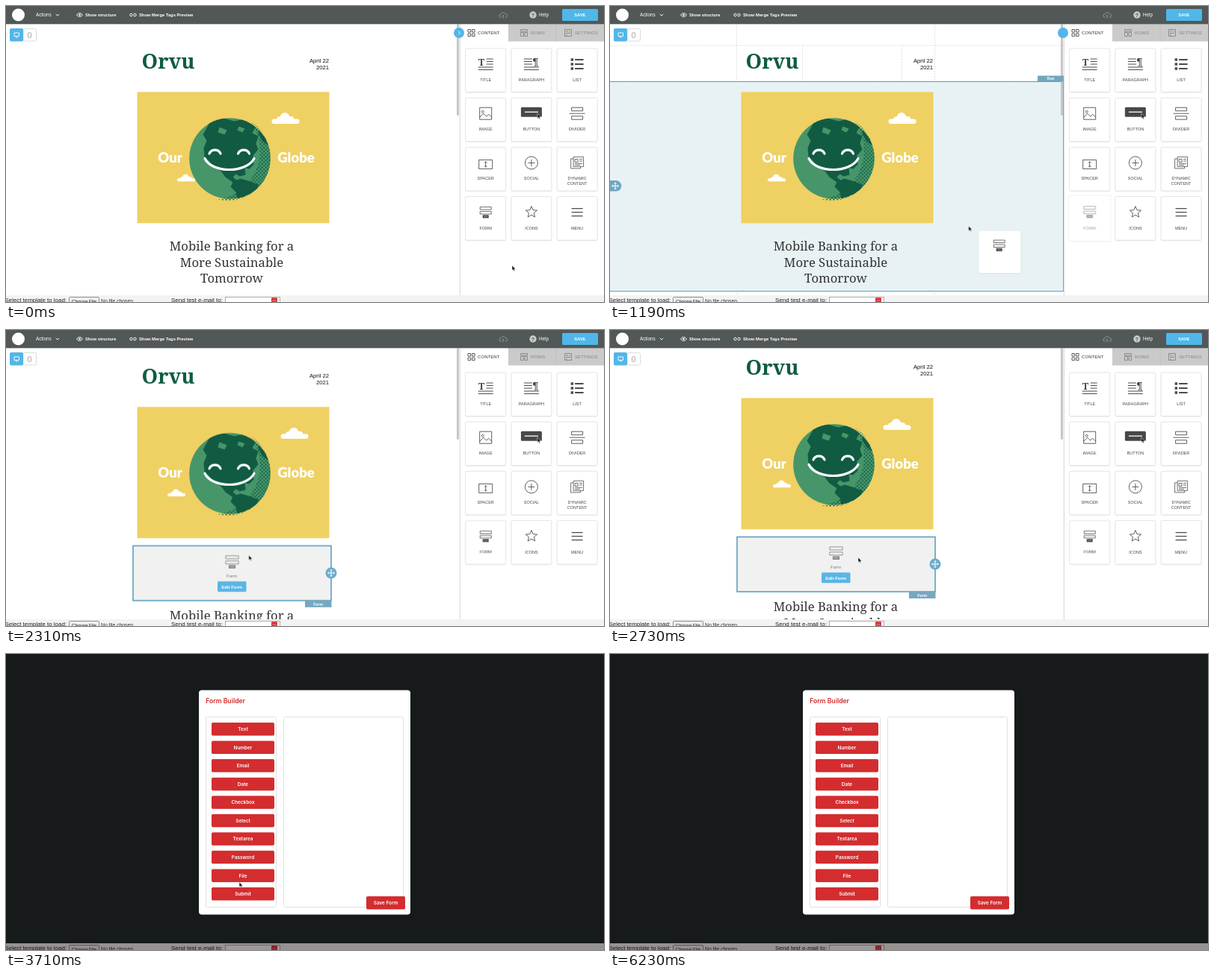
These frames come from a looping animation (800 px wide and 397 px high, 6300 ms). An HTML page:

```html
<!DOCTYPE html>
<html lang="en">
<head>
<meta charset="utf-8">
<title>Email editor form builder</title>
<style>
html, body { margin: 0; width: 100%; height: 100%; overflow: hidden; background: #fff; }
svg { display: block; width: 100vw; height: 100vh; }
text { font-family: "Liberation Sans", Arial, sans-serif; }
.mid { text-anchor: middle; }
.end { text-anchor: end; }
.bold { font-weight: 700; }
.white { fill: #fff; }
.serif { font-family: "Noto Serif", Georgia, serif; }
.round { font-family: Lato, sans-serif; font-weight: 900; }
.ui text { font-family: Inter, sans-serif; font-weight: 600; }
.line { fill: none; stroke: #4c4c4c; stroke-width: .9; }
.tile rect.card { fill: #fff; stroke: #dedede; stroke-width: .8; }
.dash { fill: none; stroke: #d2d2d2; stroke-width: .7; stroke-dasharray: 2 1.5; }

.a { animation: 6.3s linear infinite; }
.cut { animation-timing-function: step-end; }
#cursor { animation-name: cursor; }
#arrow { animation-name: arrow; }
#hand { animation-name: hand; }
#ghost { animation-name: ghost; }
#formTile { animation-name: lifted; transform-box: fill-box; transform-origin: center; }
#toggle { animation-name: toggle; }
#chevron { animation-name: chevron; }
#grid { animation-name: grid; }
.row { animation-name: row; }
#drop { animation-name: drop; }
#page { animation-name: scroll; }
#copy { animation-name: shift; }
#block { animation-name: block; }
#cloudR { animation-name: driftR; }
#cloudL { animation-name: driftL; }
#modal { animation-name: modal; }
.btn { fill: #d32d2f; animation: pass 6.3s linear infinite; }
.btn.first { animation-name: hold; }

@keyframes cursor {
  0%, 1.6% { transform: translate(677px, 348px); animation-timing-function: ease-in-out; }
  8.9%, 11.11% { transform: translate(641px, 290px); }
  18.89% { transform: translate(480px, 295px); }
  26.67%, 32.22% { transform: translate(315px, 298px); animation-timing-function: ease-out; }
  43.33%, 44.4% { transform: translate(332px, 305px); animation-timing-function: ease-in-out; }
  50%, 56.67% { transform: translate(306px, 331px); }
  58.89% { transform: translate(312px, 306px); }
  63.33%, 65.56% { transform: translate(316px, 250px); }
  73.33%, 87.78% { transform: translate(320px, 98px); }
  95.56%, 100% { transform: translate(330px, -14px); }
}
@keyframes arrow {
  0% { opacity: 1; } 25.6% { opacity: 0; } 32.22% { opacity: 1; }
  49% { opacity: 0; } 57.5% { opacity: 1; } 60% { opacity: 0; } 88.9% { opacity: 1; }
}
@keyframes hand {
  0% { opacity: 0; } 25.6% { opacity: 1; } 32.22% { opacity: 0; }
  49% { opacity: 1; } 57.5% { opacity: 0; } 60% { opacity: 1; } 88.9% { opacity: 0; }
}
@keyframes ghost {
  0%, 11.1% { opacity: 0; } 11.11%, 19% { opacity: 1; }
  25%, 32.21% { opacity: .82; } 32.22%, 100% { opacity: 0; }
}
@keyframes lifted {
  0%, 11.1% { opacity: 1; transform: none; }
  13%, 18.9% { opacity: .5; transform: scale(1.05); }
  24%, 32.21% { opacity: .5; transform: none; }
  33.3%, 100% { opacity: 1; transform: none; }
}
@keyframes toggle { 0% { opacity: 1; } 21.1% { opacity: 0; } }
@keyframes chevron { 0% { opacity: 1; } 14.4% { opacity: 0; } }
@keyframes grid { 0% { opacity: 0; } 11.11% { opacity: 1; } 32.22% { opacity: 0; } }
@keyframes row { 0% { opacity: 0; } 13.33% { opacity: 1; } 21.11% { opacity: 0; } }
@keyframes drop { 0% { opacity: 0; } 21.11% { opacity: 1; } 32.22% { opacity: 0; } }
@keyframes block { 0% { opacity: 0; } 32.22% { opacity: 1; } }
@keyframes shift { 0% { transform: none; } 32.22% { transform: translateY(73px); } }
@keyframes scroll {
  0%, 34.44% { transform: translateY(0); animation-timing-function: ease-in-out; }
  38.89%, 100% { transform: translateY(-24px); }
}
@keyframes driftR {
  0% { transform: translateX(0); } 18.89% { transform: translateX(17px); }
  26.67% { transform: translateX(15px); } 43.33% { transform: translateX(10px); }
  56.67%, 100% { transform: translateX(6px); }
}
@keyframes driftL {
  0% { transform: translateX(0); } 18.89% { transform: translateX(-18px); }
  26.67% { transform: translateX(-16px); } 43.33% { transform: translateX(-11px); }
  56.67%, 100% { transform: translateX(-7px); }
}
@keyframes modal { 0%, 56.1% { opacity: 0; } 57.8%, 100% { opacity: 1; } }
@keyframes pass { 0%, .9% { fill: #b9191c; } 1.8%, 100% { fill: #d32d2f; } }
@keyframes hold {
  0%, 72.7% { fill: #d32d2f; } 73.8%, 87.9% { fill: #b9191c; } 89.5%, 100% { fill: #d32d2f; }
}
</style>
</head>
<body>
<svg viewBox="0 0 800 397" preserveAspectRatio="none">
  <defs>
    <clipPath id="stage"><rect y="24" width="607" height="364"/></clipPath>
    <clipPath id="ball"><circle r="54.3"/></clipPath>
    <pattern id="dots" width="3.4" height="3.4" patternUnits="userSpaceOnUse" patternTransform="rotate(45)">
      <circle cx="1.7" cy="1.7" r="1.05" fill="#125b43"/>
    </pattern>
    <g id="formIcon">
      <path class="line" style="stroke-width:.8" d="M-7.500-7h15v3.500h-15zM-7.500-1h15v3.500h-15z"/>
      <rect x="-4" y="3.800" width="8" height="4" fill="#444"/>
      <path d="M-2.500 5.800h5" stroke="#bbb" stroke-width=".7"/>
    </g>
    <g id="cloud" fill="#fff">
      <rect x="-18.500" y="1" width="37" height="6.500" rx="3.200"/>
      <circle cx="-1" cy="-1" r="6.500"/><circle cx="-8" cy="2" r="4.200"/><circle cx="7" cy="2" r="4.500"/>
    </g>
    <path id="move" d="M-4.500 0h9M0-4.500v9M-3-1.500L-4.500 0-3 1.500M3-1.500L4.500 0 3 1.500M-1.500-3L0-4.500 1.500-3M-1.500 3L0 4.500 1.500 3" fill="none" stroke="#fff" stroke-width="1"/>
    <path id="pointer" d="M-1.200 0q0-1.200 1.200-1.200t1.200 1.200v2.200l3 .8q1 .4.800 1.600l-.8 3.400h-4.200L-2.600 5q-.4-1 .5-1.200l.9.500z" fill="#fff" stroke="#222" stroke-width=".8"/>
    <path id="tip" d="M0 0v6.600l1.500-1.300 1 2.300 1.200-.5-1-2.200h2z" fill="#111" stroke="#fff" stroke-width=".5"/>
  </defs>

  <rect width="800" height="397" fill="#fff"/>

  <g clip-path="url(#stage)">
    <g id="grid" class="a cut">
      <path class="dash" d="M169.500 24v364M434.500 24v364M0 53h607M0 101h607M257.500 53v48M390.500 53v48M0 382.500h607"/>
    </g>
    <g class="row a cut">
      <rect x="-1" y="101.500" width="607.500" height="281" fill="#e8f2f4" stroke="#5e9fbe"/>
      <path d="M0 234h8a7.300 7.300 0 0 1 0 14.600H0z" fill="#6fa7c2"/>
      <use href="#move" x="7" y="241.300"/>
    </g>

    <g id="page" class="a">
      <text class="serif" x="181.500" y="83.500" font-size="27.500" font-weight="900" fill="#0f5b44">Orvu</text>
      <g class="end" font-size="7.700" fill="#111">
        <text x="432" y="76">April 22</text><text x="432" y="85">2021</text>
      </g>
      <rect x="175.500" y="115.300" width="257" height="176" fill="#efd062"/>
      <g transform="translate(299.500 204.500)">
        <circle r="54.300" fill="#46966a"/>
        <g clip-path="url(#ball)" fill="#125b43">
          <path d="M-26-50L-12-55 6-50 24-54 34-42 30-34 38-30 35-20 38-12 31-4 32 8 26 14 20 13 21 22 13 24 8 21 4 25 10 30 4 32-6 25-12 17-21 12-28 3-34-2-35-14-31-24-36-32z"/>
          <path d="M4 31L14 27 25 30 38 35 36 44 26 50 20 56 10 55 8 45 1 38z"/>
          <path d="M40-44L52-30 50-18 43-24 38-34z"/>
          <path d="M-14-42l10 4-3 6-9-3zM12-43l8 3-3 5-7-3z" fill="#46966a"/>
        </g>
        <path d="M27-50A57.500 57.500 0 0 1-16 55A66 66 0 0 0 27-50z" fill="url(#dots)"/>
        <g fill="none" stroke="#fff" stroke-width="3.200" stroke-linecap="round">
          <path d="M-27.500-6.500a8 7.500 0 0 1 15 0M11-6.500a8 7.500 0 0 1 15 0"/>
          <path d="M-33.500 0C-24 20 22 20 32.500 0"/>
        </g>
      </g>
      <g class="mid white" font-size="18.500">
        <text class="round" x="219.500" y="210">Our</text><text class="round" x="388" y="210">Globe</text>
      </g>
      <g id="cloudR" class="a"><use href="#cloud" transform="translate(374 150.500)"/></g>
      <g id="cloudL" class="a"><use href="#cloud" transform="translate(241 230.500) scale(.65)"/></g>

      <g id="copy" class="a cut">
        <g class="mid" font-size="16.650" fill="#333">
          <text class="serif" x="302" y="328">Mobile Banking for a</text>
          <text class="serif" x="302" y="349.500">More Sustainable</text>
          <text class="serif" x="302" y="371">Tomorrow</text>
        </g>
      </g>

      <g id="block" class="a cut">
        <rect x="170" y="301.500" width="265" height="73.500" fill="#f1f1f1" stroke="#5d9fc0" stroke-width="1.600"/>
        <use href="#formIcon" transform="translate(302.500 323) scale(1.150)" opacity=".6"/>
        <text class="mid" x="302" y="343.500" font-size="6" fill="#777">Form</text>
        <rect x="283" y="349.300" width="38.500" height="14" rx="1.500" fill="#5ab5e6"/>
        <text class="mid white bold" x="302.200" y="358.500" font-size="6">Edit Form</text>
        <rect x="400" y="375" width="35.500" height="9" fill="#76a8c0"/>
        <text class="mid white bold" x="417.700" y="381.500" font-size="5.200">Form</text>
        <circle cx="435" cy="338" r="7.500" fill="#6baaca"/><use href="#move" x="435" y="338"/>
      </g>
    </g>

    <g id="drop" class="a cut">
      <rect x="170" y="301.500" width="265" height="81" fill="none" stroke="#5d9fc0" stroke-width="1.500"/>
      <rect x="168" y="299.800" width="267" height="3" fill="#6bbbe2"/>
      <rect x="279" y="296.500" width="47" height="10" rx="5" fill="#68bbe2"/>
      <text class="mid white bold" x="302" y="303.300" font-size="4.800">Drag it here</text>
      <rect x="400" y="382.500" width="35.500" height="9" fill="#72a6be"/>
      <text class="mid white bold" x="417.700" y="389" font-size="5.200">Paragraph</text>
    </g>
  </g>

  <!-- canvas chrome -->
  <rect x="23" y="30.500" width="17.500" height="16.500" rx="2" fill="#fff" stroke="#d2d2d2" stroke-width=".8"/>
  <rect x="5" y="30" width="18" height="17.500" rx="2" fill="#53b6e8"/>
  <path d="M11 36h6.500v4.500h-6.500zM12.800 42h3" fill="none" stroke="#fff" stroke-width=".9"/>
  <rect x="29.500" y="35.800" width="4" height="6.500" rx=".7" fill="none" stroke="#888" stroke-width=".7"/>
  <rect x="603" y="24" width="3" height="123" rx="1.500" fill="#c6c6c6"/>
  <g class="row a cut">
    <rect x="572" y="93.500" width="35" height="8" fill="#72a6be"/>
    <text class="mid white bold" x="589.500" y="99.400" font-size="4.500">Row</text>
  </g>

  <!-- side panel -->
  <rect x="607" y="24" width="193" height="364" fill="#fff"/>
  <path d="M607.300 24v364" stroke="#d4d4d4"/>
  <rect x="672" y="24" width="128" height="23.500" fill="#cacaca"/>
  <path d="M736 24v23.500" stroke="#bdbdbd" stroke-width=".7"/>
  <g class="line" style="stroke-width:.9">
    <path d="M618 31.500h3.600v3.600h-3.600zM623.500 31.500h3.600v3.600h-3.600zM618 37h3.600v3.600h-3.600zM623.500 37h3.600v3.600h-3.600z"/>
    <path stroke="#858585" d="M688.500 31.500h9v2.500h-9zM688.500 35.500h4v5h-4zM694 35.500h3.500v5h-3.500zM747.500 31.500h9v9h-9zM749 34h3M753.500 34h1.500M749 36.500h6M749 39h2"/>
  </g>
  <g font-size="6.100">
    <text x="631" y="38.200" fill="#333">CONTENT</text>
    <g fill="#858585"><text x="702" y="38.200">ROWS</text><text x="761" y="38.200">SETTINGS</text></g>
  </g>
  <g id="tiles"></g>
  <g id="toggle" class="a cut">
    <circle cx="606" cy="36" r="7" fill="#53b6e8"/>
    <path id="chevron" class="a cut" d="M605 33.700l2.300 2.300-2.300 2.300" fill="none" stroke="#fff" stroke-width=".9"/>
  </g>

  <!-- top bar -->
  <rect width="800" height="24.300" fill="#525757"/>
  <circle cx="16.500" cy="12" r="8.500" fill="#fff"/>
  <g class="white" font-size="6.300">
    <text x="40" y="13.900">Actions</text>
    <text class="bold" x="106" y="13.700" font-size="5.700">Show structure</text>
    <text class="bold" x="178" y="13.600" font-size="5.800">Show Merge Tags Preview</text>
    <text x="713" y="14.200">Help</text>
  </g>
  <g fill="none" stroke="#fff" stroke-width="1">
    <path d="M66.700 11l2.200 2 2.200-2"/>
    <path d="M94.500 12q4-5 8 0q-4 5-8 0z"/>
    <path d="M169 10.300h-1.500a1.700 1.700 0 0 0 0 3.400h1.500M171 10.300h1.500a1.700 1.700 0 0 1 0 3.400h-1.500M168.300 12h3.400"/>
    <path stroke="#9da1a1" d="M662.500 15.500a2.500 2.500 0 0 1 0-5a3 3 0 0 1 5.500 0a2.500 2.500 0 0 1 0 5M665 16.500v-4M663.500 13.800l1.500-1.500 1.500 1.500" stroke-width=".8"/>
  </g>
  <circle cx="98.500" cy="12" r="1.300" fill="#fff"/>
  <circle cx="705" cy="12" r="4.700" fill="#c9cbcb"/>
  <text class="mid bold" x="705" y="14.500" font-size="7" fill="#525757">?</text>
  <rect x="744" y="4" width="48" height="16" rx="1.500" fill="#50b7e9"/>
  <text class="mid white bold" x="767.700" y="14" font-size="5.700">SAVE</text>

  <!-- bottom strip -->
  <rect y="388" width="800" height="9" fill="#f3f3f3"/>
  <text x="-1.500" y="397" font-size="7.900" fill="#222">Select template to load:</text>
  <rect x="84.500" y="390.500" width="40" height="10" rx="1" fill="#efefef" stroke="#777" stroke-width=".8"/>
  <text x="88" y="397.500" font-size="6.200" fill="#111">Choose File</text>
  <text x="127" y="397.500" font-size="6.800" fill="#333">No file chosen</text>
  <text x="221" y="397" font-size="8" fill="#222">Send test e-mail to:</text>
  <rect x="293.500" y="390.500" width="73" height="10" fill="#fff" stroke="#999" stroke-width=".8"/>
  <rect x="355" y="391.300" width="8" height="6" rx="1" fill="#dc2f35"/>
  <path d="M356.500 395h5" stroke="#fff" stroke-width=".8" stroke-dasharray="1 1"/>

  <g id="modal" class="a ui">
    <rect width="800" height="388" fill="#161a1b"/>
    <rect y="388" width="800" height="9" fill="#0a0000" fill-opacity=".4"/>
    <rect x="258" y="48.500" width="283" height="301" rx="4" fill="#fff"/>
    <text x="267.300" y="65.800" font-size="8.600" fill="#cf2c2e">Form Builder</text>
    <g fill="#fff" stroke="#dedede" stroke-width=".9">
      <rect x="267.500" y="84.500" width="94" height="255" rx="2"/>
      <rect x="371.500" y="84.500" width="160" height="255" rx="2"/>
    </g>
    <g id="fields" class="mid" font-size="6.400"></g>
    <rect x="482" y="325" width="52" height="17.500" rx="1.800" fill="#d32d2f"/>
    <text class="mid white" x="508" y="336.200" font-size="6.400">Save Form</text>
  </g>

  <g id="cursor" class="a">
    <g id="ghost" class="a">
      <rect x="12.500" y="6" width="58" height="58.500" rx="2" fill="#000" opacity=".05"/>
      <rect x="13.500" y="6.500" width="56" height="56.500" rx="1.500" fill="#fff"/>
      <use href="#formIcon" x="41" y="26"/>
    </g>
    <use id="arrow" class="a cut" href="#tip"/>
    <use id="hand" class="a cut" href="#pointer"/>
  </g>
</svg>
<script>
const star = Array.from({ length: 10 }, (_, i) => {
  const r = i % 2 ? 3.6 : 8, a = i * Math.PI / 5;
  return `${(r * Math.sin(a)).toFixed(2)},${(-r * Math.cos(a)).toFixed(2)}`;
}).join(" ");
const line = (d, w = .9) => `<path class="line" style="stroke-width:${w}" d="${d}"/>`;
const glyph = (x, c) =>
  `<text class="mid bold serif" x="${x}" y="1.500" font-size="12.500" fill="#444">${c}</text>`;

const tiles = [
  ["TITLE", glyph(-5.5, "T") + line("M1-7h9M1-3.500h9M1 0h9M-10 4h20M-10 7.500h20", 1.2)],
  ["PARAGRAPH", glyph(5.5, "¶") + line("M-10-7h11M-10-3.500h11M-10 0h11M-10 4h20M-10 7.500h20", 1.2)],
  ["LIST", line("M-8.500-6h3.500M-8.500 0h3.500M-8.500 6h3.500", 3.5) + line("M-3-6h11.500M-3 0h11.500M-3 6h11.500", 1.8)],
  ["IMAGE", line("M-8-8h16v16h-16zM-8 5l5-5 4 4 3-3 4 4M-4-4a1.500 1.500 0 1 0 .1 0z")],
  ["BUTTON", `<rect x="-14" y="-8.500" width="28" height="13" rx="1.500" fill="#484848"/>
    <path d="M-9-2h18" stroke="#fff" stroke-width="1.300"/><use href="#tip" x="8" y="0"/>`],
  ["DIVIDER", line("M-7.500-8h15v4.500h-15zM-7.500 3.500h15v4.500h-15zM-10.500 0h21")],
  ["SPACER", line("M-9-4h18v12h-18zM0-1.500v7M-1.500 0L0-1.800 1.500 0M-1.500 4L0 5.800 1.500 4")],
  ["SOCIAL", `<circle class="line" r="8.500"/>` + line("M-4.500 0h9M0-4.500v9")],
  ["DYNAMIC|CONTENT", line("M-5-8h13.500v13h-13.500zM-5-5.500h-3.500v13h13v-2.500M-3-5h4v4h-4zM3-5h4M3-2.500h4M-3 1h10M-3 3h7", .8)],
  ["FORM", `<use href="#formIcon"/>`],
  ["ICONS", `<polygon class="line" points="${star}"/>`],
  ["MENU", line("M-7.500-5h15M-7.500 0h15M-7.500 5h15", 1.4)]
];

document.getElementById("tiles").innerHTML = tiles.map(([name, icon], i) => {
  const x = 641.7 + (i % 3) * 61.2, y = 57 + Math.floor(i / 3) * 66.2;
  const label = name.split("|").map((s, k) =>
    `<text class="mid" y="${44 + k * 6.5}" font-size="5.500" fill="#444">${s}</text>`).join("");
  const attrs = name === "FORM" ? 'id="formTile" class="tile a"' : 'class="tile"';
  return `<g transform="translate(${x} ${y})"><g ${attrs}>
    <rect x="-27.300" y=".8" width="54.600" height="59" rx="2" fill="#000" opacity=".06"/>
    <rect class="card" x="-27" width="54" height="58.500" rx="1.500"/>
    <g transform="translate(0 21)">${icon}</g>${label}</g></g>`;
}).join("");

const fields = ["Text", "Number", "Email", "Date", "Checkbox", "Select", "Textarea", "Password", "File", "Submit"];
const early = [3955, 3835, 3712, 3575];
document.getElementById("fields").innerHTML = fields.map((name, i) => {
  const y = 92 + i * 24.55;
  const delay = i > 5 ? early[i - 6] : i ? 4186 + (5 - i) * 79.3 : 0;
  return `<rect class="btn${i ? "" : " first"}" style="animation-delay:${delay}ms"
    x="275" y="${y}" width="84" height="17.500" rx="1.800"/>
    <text class="white" x="317" y="${y + 11.1}">${name}</text>`;
}).join("");
</script>
</body>
</html>
```
